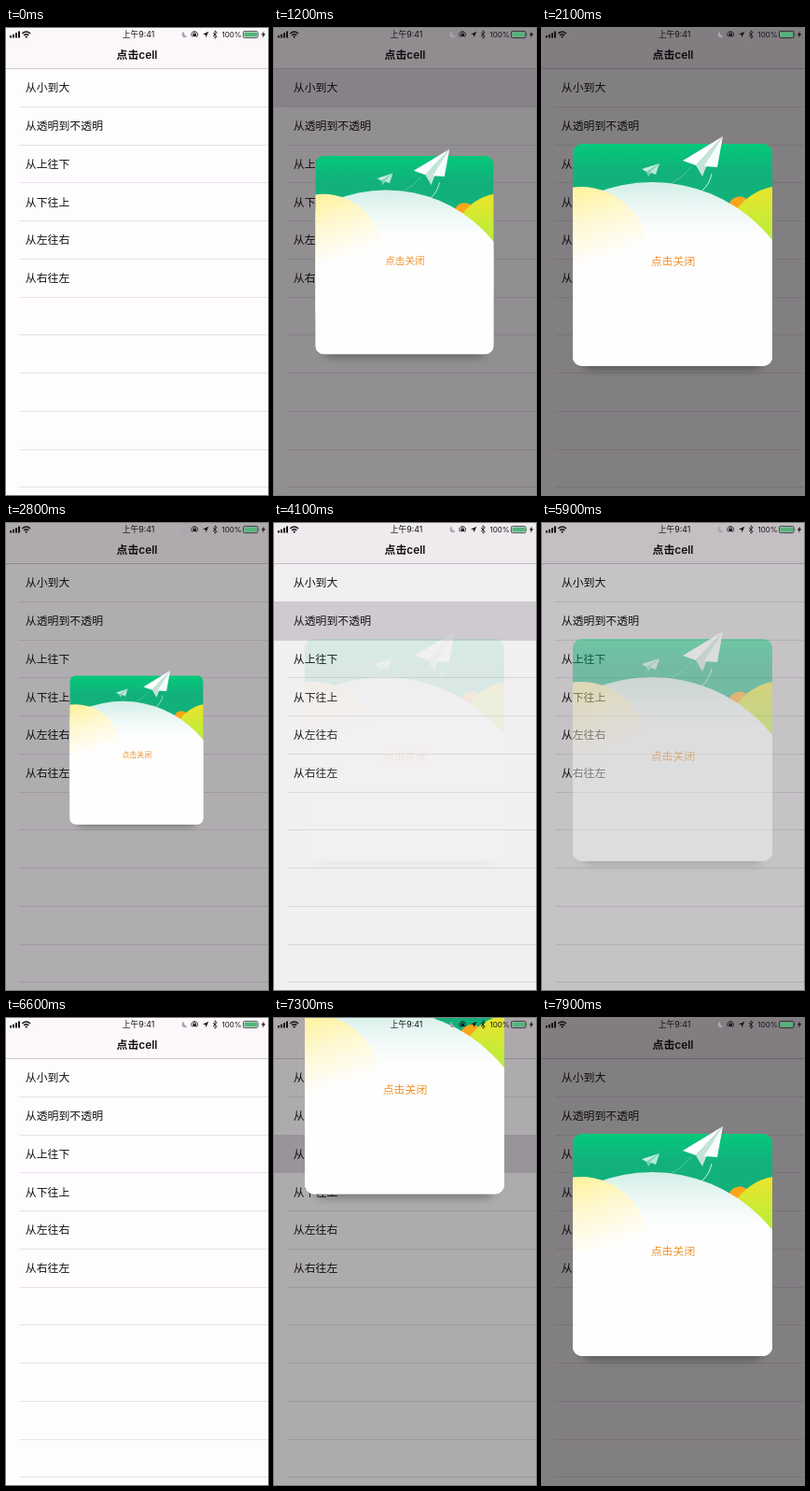
An HTML page that plays this animation: 281x500 px, repeating every 8 s.

```html
<!DOCTYPE html>
<html lang="zh-CN">
<head>
<meta charset="utf-8">
<title>点击cell</title>
<style>
  html, body { margin: 0; width: 100%; height: 100%; overflow: hidden; background: #fefcfe; }
  svg { display: block; width: 100vw; height: 100vh; }
  text { font: 11.9px Inter, "Noto Sans CJK SC", "Noto Sans CJK", sans-serif; fill: #141214; }
  .title { font-weight: 600; text-anchor: middle; }
  .close { fill: #ef9430; text-anchor: middle; }
  .clock { font-size: 8.8px; text-anchor: middle; }
  .charge { font-size: 8px; }

  .row-hit { fill: #d9d5da; opacity: 0; animation: deselect 8s linear infinite; }
  .dim { fill: #080408; animation: dim 8s ease-in-out infinite; }
  .card { transform-origin: 140px 243px; animation: card 8s ease-in-out infinite; }

  @keyframes deselect {
    0%, 2.75% { opacity: 1; }
    10%, 100% { opacity: 0; }
  }
  /* the first and last entrances settle like a spring */
  @keyframes dim {
    0% { opacity: 0; }
    8.875% { opacity: 0; animation-timing-function: cubic-bezier(.27, .2, .25, 1); }
    19.5%, 32.375% { opacity: .5; }
    38.625%, 49% { opacity: 0; }
    59%, 68.5% { opacity: .5; }
    78.5% { opacity: 0; }
    87.375% { opacity: 0; animation-timing-function: cubic-bezier(.27, .2, .25, 1); }
    98%, 100% { opacity: .5; }
  }
  /* zoom in and out, fade in and out, then drop from above */
  @keyframes card {
    0%, 8.87% { opacity: 0; transform: translateY(0) scale(.1); }
    8.875% { opacity: 1; transform: translateY(0) scale(.1); animation-timing-function: cubic-bezier(.27, .2, .25, 1); }
    19.5%, 32.375% { opacity: 1; transform: translateY(0) scale(1); }
    38.625% { opacity: 1; transform: translateY(0) scale(.1); }
    38.63%, 49% { opacity: 0; transform: translateY(0) scale(1); }
    59%, 68.5% { opacity: 1; transform: translateY(0) scale(1); }
    78.5% { opacity: 0; transform: translateY(0) scale(1); }
    78.51%, 87.37% { opacity: 0; transform: translateY(-500px) scale(1); }
    87.375% { opacity: 1; transform: translateY(-500px) scale(1); animation-timing-function: cubic-bezier(.27, .2, .25, 1); }
    98%, 100% { opacity: 1; transform: translateY(0) scale(1); }
  }
</style>
</head>
<body>
<svg viewBox="0 0 281 500" preserveAspectRatio="none">
  <defs>
    <linearGradient id="sky" x2="0" y2="1">
      <stop stop-color="#04c97a"/><stop offset=".3" stop-color="#12b17c"/>
    </linearGradient>
    <linearGradient id="snow" gradientUnits="userSpaceOnUse" x1="0" y1="165" x2="0" y2="222">
      <stop stop-color="#d3eee8"/><stop offset=".55" stop-color="#eff9f7"/><stop offset="1" stop-color="#fefefe"/>
    </linearGradient>
    <linearGradient id="sand" gradientUnits="userSpaceOnUse" x1="46" y1="170" x2="72" y2="246">
      <stop stop-color="#fdf3a0"/><stop offset=".45" stop-color="#fff8d2"/><stop offset="1" stop-color="#fefefe"/>
    </linearGradient>
    <linearGradient id="lime" gradientUnits="userSpaceOnUse" x1="0" y1="169" x2="0" y2="224">
      <stop stop-color="#ebe42a"/><stop offset="1" stop-color="#b9ee3c"/>
    </linearGradient>
    <clipPath id="frame"><rect x="33" y="124" width="214" height="238" rx="10"/></clipPath>
    <filter id="soft" x="-20%" y="-20%" width="140%" height="140%"><feGaussianBlur stdDeviation="5"/></filter>
  </defs>

  <rect width="281" height="500" fill="#fefcfe"/>
  <g id="list"></g>
  <rect width="281" height="43" fill="#fbf7fb"/>
  <rect y="43" width="281" height="1" fill="#cdc8cd"/>
  <text class="title" x="140.5" y="33">点击cell</text>

  <rect class="dim" width="281" height="500"/>

  <g class="card">
    <rect x="43" y="140" width="194" height="226" rx="10" opacity=".3" filter="url(#soft)"/>
    <g clip-path="url(#frame)">
      <rect x="33" y="124" width="214" height="100" fill="url(#sky)"/>
      <circle cx="212" cy="192.5" r="12" fill="#fba61a"/>
      <circle cx="258" cy="229" r="60" fill="url(#lime)"/>
      <circle cx="118" cy="330" r="165" fill="url(#snow)"/>
      <rect x="33" y="240" width="214" height="122" fill="#fefefe"/>
      <circle cx="42" cy="242" r="72" fill="url(#sand)"/>
    </g>
    <g fill="none" stroke="#fff" stroke-width=".8">
      <path d="M182 156Q180 167 171 175"/>
      <path d="M160 149Q150 161 138 167" opacity=".35"/>
    </g>
    <path d="M194 116L151 142L165 147Z" fill="#fff"/>
    <path d="M194 116L165 147L172 159L176 149Z" fill="#c5e3da"/>
    <path d="M194 116L174 148L188 149Z" fill="#f7fdfb"/>
    <g fill="#fff">
      <path d="M126 145L107 151L112 154Z" opacity=".75"/>
      <path d="M126 145L112 154L114 159L117 155Z" opacity=".45"/>
      <path d="M126 145L116 154.5L122 157Z" opacity=".7"/>
    </g>
    <text class="close" x="140.5" y="254.4">点击关闭</text>
  </g>

  <g fill="#141214">
    <path d="M4 8h2v2.5h-2zM7 6.7h2v3.8h-2zM10 5.2h2v5.3h-2zM13 3.5h2v7h-2z"/>
    <g fill="none" stroke="#141214" stroke-width="1.4">
      <path d="M17.3 6Q21.7 2 26.1 6M19.1 8Q21.7 5.7 24.3 8"/>
    </g>
    <circle cx="21.7" cy="9.6" r="1.1"/>
    <text class="clock" x="142" y="10.2">上午9:41</text>
    <path d="M191 3.8A3.3 3.3 0 1 0 194.6 8.8A3.9 3.9 0 0 1 191 3.8Z" fill="#aaa5ab"/>
    <g fill="none" stroke="#141214" stroke-width=".8">
      <path d="M200 9.6A3.4 3.4 0 1 1 204.3 9.7M201.2 6.5v-.8a1.1 1.1 0 0 1 2.2 0v.8"/>
      <path d="M222 5l4.3 4.2l-2.2 2v-8.4l2.2 2l-4.3 4.2"/>
      <rect x="254.4" y="3.4" width="15.6" height="7.2" rx="1.4" stroke-width=".7"/>
    </g>
    <rect x="200.5" y="6.3" width="3.6" height="2.8"/>
    <path d="M217.3 3.8L211 6.8L214 7.2L214.4 10.3Z"/>
    <text class="charge" x="231.5" y="10">100%</text>
    <rect x="255.4" y="4.4" width="13.6" height="5.2" rx=".6" fill="#55b47c"/>
    <path d="M270.7 5.7q1 1.3 0 2.6z"/>
    <path d="M276.8 3.4L273.8 7.5H275.8L275 10.7L278.2 6.3H276.2Z"/>
  </g>
</svg>
<script>
  const rows = ["从小到大", "从透明到不透明", "从上往下", "从下往上", "从左往右", "从右往左"];
  const taps = [710, 3880, 6990];
  const listTop = 43.5, pitch = 40.75;
  const list = document.getElementById("list");
  const lineY = i => Math.floor(listTop + pitch * i);

  const add = (tag, attrs, label = "") => {
    const el = document.createElementNS("http://www.w3.org/2000/svg", tag);
    for (const key in attrs) el.setAttribute(key, attrs[key]);
    el.textContent = label;
    list.append(el);
  };

  for (let i = 1; i <= 11; i++)
    add("rect", { x: 14, y: lineY(i), width: 267, height: 1, fill: "#e6e2e7" });

  taps.forEach((ms, i) => add("rect", {
    class: "row-hit", y: lineY(i), width: 281, height: lineY(i + 1) - lineY(i) + 1,
    style: `animation-delay:${ms}ms`
  }));

  rows.forEach((label, i) =>
    add("text", { x: 20.8, y: listTop + pitch * (i + .5) + 4.6 }, label));
</script>
</body>
</html>
```
